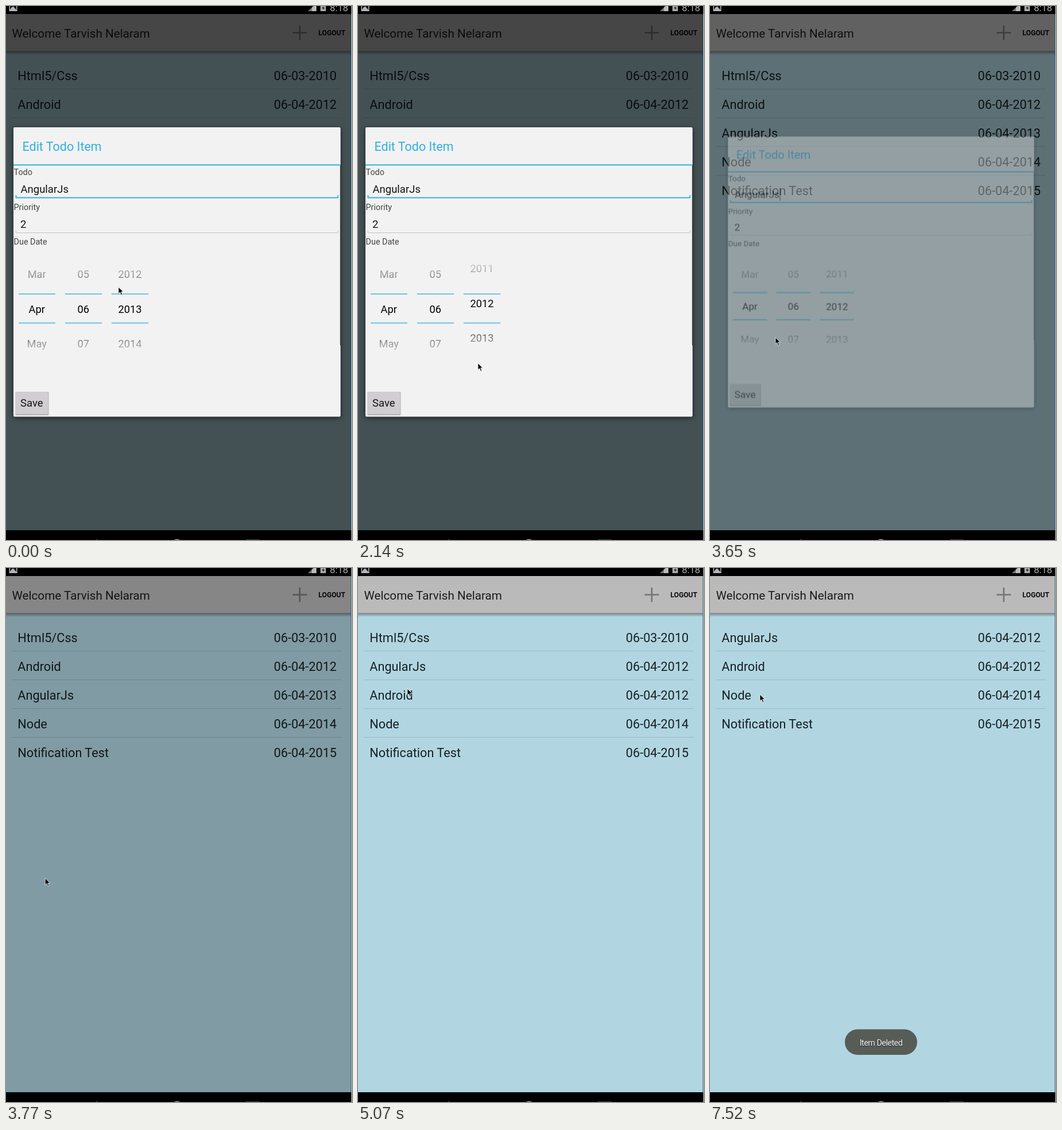
Animation, 603 px wide and 929 px high, one loop 8000 ms. Source, as an HTML page:

```html
<!DOCTYPE html>
<html lang="en">
<head>
<meta charset="utf-8">
<title>Todo list</title>
<style>
html, body { margin: 0; width: 100%; height: 100%; overflow: hidden; background: #000; }
svg { display: block; width: 603px; height: 929px; font-family: Roboto, sans-serif; }
.row { font-size: 21.7px; fill: #182023; }
.label { font-size: 14.4px; fill: #444; }
.input { font-size: 18.5px; fill: #141414; }
.wheel { font-size: 18.3px; fill: #000; text-anchor: middle; }

.list, #dialog, #dim, #press { animation: 8s step-end infinite; }
#list0 { animation-name: list0; }
#list1 { animation-name: list1; }
#list2 { animation-name: list2; }
#list3 { animation-name: list3; }
@keyframes list0 { 0% { opacity: 1 } 53.5%, 100% { opacity: 0 } }
@keyframes list1 { 0% { opacity: 0 } 53.5% { opacity: 1 } 55.375%, 100% { opacity: 0 } }
@keyframes list2 { 0% { opacity: 0 } 55.375% { opacity: 1 } 88%, 100% { opacity: 0 } }
@keyframes list3 { 0% { opacity: 0 } 88%, 100% { opacity: 1 } }

#press { animation-name: press; }
@keyframes press {
  0% { opacity: 0 } 72.5% { opacity: .35 } 76.25% { opacity: .5 }
  78.125% { opacity: .65 } 80%, 100% { opacity: 0 }
}

#dim { animation-name: dim; }
@keyframes dim {
  0% { opacity: .62 } 45.625% { opacity: .48 } 47.125% { opacity: .28 }
  48.625% { opacity: .09 } 50.125% { opacity: .03 } 52%, 100% { opacity: 0 }
}

#dialog { transform-origin: 298px 462.5px; animation-name: close; }
@keyframes close {
  0% { transform: none; opacity: 1 }
  44.125% { transform: scale(.975); opacity: .75 }
  45.625% { transform: scale(.936); opacity: .37 }
  47.125%, 100% { transform: scale(.9); opacity: 0 }
}
#panel { filter: drop-shadow(0 2px 4px rgba(0,0,0,.6)); }

#caret { animation: blink 1s step-end infinite; }
@keyframes blink { 0% { opacity: 0 } 23% { opacity: 1 } 73%, 100% { opacity: 0 } }

#years { animation: spin 8s steps(1, end) infinite; }
@keyframes spin {
  0% { transform: none }
  16.04% { transform: none; animation-timing-function: steps(6, end) }
  26.75% { transform: translateY(50.5px) }
  28.5% { transform: translateY(58px) }
  30%, 100% { transform: translateY(60.5px) }
}

#toast { animation: toast 8s steps(4, end) infinite; }
@keyframes toast { 0%, 88% { opacity: 0 } 94%, 100% { opacity: 1 } }

#cursor { animation: move 8s steps(1, end) infinite; }
@keyframes move {
  0% { transform: translate(196px, 489px); animation-timing-function: steps(4, end) }
  7% { transform: translate(79px, 535px); animation-timing-function: steps(5, end) }
  14.25% { transform: translate(212px, 567px); animation-timing-function: steps(7, end) }
  26.75% { transform: translate(209px, 621.5px) }
  28.5% { transform: translate(209px, 638px); animation-timing-function: steps(5, end) }
  36.875% { transform: translate(46px, 685px) }
  40.375% { transform: translate(46px, 685px); animation-timing-function: steps(4, end) }
  45.625% { transform: translate(114px, 576.5px); animation-timing-function: steps(2, end) }
  48.625% { transform: translate(22.5px, 503px); animation-timing-function: steps(2, end) }
  52% { transform: translate(85px, 212px) }
  58.875% { transform: translate(85px, 212px); animation-timing-function: steps(3, end) }
  63.375% { transform: translate(86px, 210px); animation-timing-function: steps(3, end) }
  68.625% { transform: translate(99px, 122.5px) }
  82% { transform: translate(99px, 122.5px); animation-timing-function: steps(7, end) }
  92.5%, 100% { transform: translate(87px, 220px) }
}
</style>
</head>
<body>
<svg viewBox="0 0 603 929">
  <defs>
    <linearGradient id="shade" x1="0" y1="0" x2="0" y2="1">
      <stop offset="0" stop-opacity=".3"/><stop offset="1" stop-opacity="0"/>
    </linearGradient>
    <linearGradient id="fade" gradientUnits="userSpaceOnUse" x1="0" y1="437" x2="0" y2="617">
      <stop offset="0" stop-color="#fff" stop-opacity="0"/>
      <stop offset=".44" stop-color="#fff"/>
      <stop offset=".56" stop-color="#fff"/>
      <stop offset="1" stop-color="#fff" stop-opacity="0"/>
    </linearGradient>
    <mask id="drum" maskUnits="userSpaceOnUse" x="13" y="437" width="250" height="180">
      <rect x="13" y="437" width="250" height="180" fill="url(#fade)"/>
    </mask>
  </defs>

  <rect width="603" height="929"/>
  <g id="app">
    <rect y="14" width="602" height="898" fill="#b1d6e1"/>
    <rect y="14" width="602" height="65" fill="#bababa"/>
    <rect y="78" width="602" height="2" fill="#8d9193"/>
    <rect y="80" width="602" height="5" fill="url(#shade)"/>
    <text x="10.5" y="55" font-size="20.7" fill="#1c1c1c">Welcome Tarvish Nelaram</text>
    <path d="M512 34v25M499.500 46.500h25" stroke="#747474" stroke-width="2.600"/>
    <text x="544.500" y="51" font-size="12.200" font-weight="700" fill="#0c0c0c">LOGOUT</text>
    <rect id="press" x="10" y="95" width="576" height="50" fill="#33b5e5"/>
    <g id="lists"></g>
  </g>
  <rect id="dim" y="14" width="602" height="898"/>

  <g id="dialog">
    <rect id="panel" x="13" y="211" width="570" height="503.500" rx="2" fill="#f2f2f2"/>
    <rect x="582" y="277" width="1" height="313" fill="#666"/>
    <text x="28.500" y="252" font-size="21.500" fill="#33b0de">Edit Todo Item</text>
    <rect x="13" y="275.500" width="569.500" height="2" fill="#33b0de"/>
    <text class="label" x="13.500" y="294">Todo</text>
    <text class="input" x="25.500" y="325">AngularJs</text>
    <rect id="caret" x="109.500" y="307" width="1.500" height="23.500" fill="#444"/>
    <path d="M17.500 329v4.500h561V329" fill="none" stroke="#3db0d3" stroke-width="1.800"/>
    <text class="label" x="13.500" y="354.500">Priority</text>
    <text class="input" x="25" y="385.500">2</text>
    <path d="M17.500 390.500v4h561v-4" fill="none" stroke="#c3c3c3"/>
    <text class="label" x="13.500" y="415">Due Date</text>
    <g id="picker" mask="url(#drum)"></g>
    <path d="M22 501h64M103 501h64M184 501h64M22 551.500h64M103 551.500h64M184 551.500h64" stroke="#6cc4e6" stroke-width="2"/>
    <rect x="16.500" y="671" width="58" height="41" rx="1.500" fill="#b4b2b5"/>
    <rect x="17" y="671" width="56.500" height="39" rx="1" fill="#d0ced1"/>
    <text class="input" x="25" y="697">Save</text>
  </g>

  <g id="toast">
    <rect x="235" y="802.500" width="126" height="44.500" rx="22" fill="#575d56"/>
    <text x="298" y="831" font-size="14.400" letter-spacing="-.55" text-anchor="middle" fill="#f4f4f4"
      style="text-shadow:0 1px 2px #222">Item Deleted</text>
  </g>

  <g id="bars">
    <rect x="601" y="14" width="1" height="898" fill="#2c4a60"/>
    <rect x="602" width="1" height="929" fill="#dbe6ec"/>
    <rect x="5.500" width="14" height="9" fill="#b4b4b4"/>
    <path d="M7 6.500V0h11v6.500l-3-3-2-2.500-3 1z" fill="#111"/>
    <path d="M526 9L541 -4V9z" fill="#777"/>
    <path d="M533 9V2.500L541 -4V9z" fill="#bbb"/>
    <rect x="548" width="9.500" height="9" fill="#aaa"/>
    <path d="M554 0l-3.500 4h2.500l-1 3 3.500-4h-2.500z"/>
    <text x="564.500" y="8.500" font-size="16.500" fill="#b0b0b0">8:18</text>
    <path d="M290 930q8-5 16 0z" fill="#aaa"/>
    <path d="M418 928.500h24M157 928.500h3" stroke="#444"/>
  </g>
  <path id="cursor" d="M0 0V11.500L2.700 9L4.800 13.700L6.800 12.800L4.700 8.300H8.400Z" stroke="#fff" stroke-width=".8"/>
</svg>
<script>
const html5 = ["Html5/Css", "06-03-2010"];
const android = ["Android", "06-04-2012"];
const angular = year => ["AngularJs", "06-04-" + year];
const rest = [["Node", "06-04-2014"], ["Notification Test", "06-04-2015"]];
const states = [
  [html5, android, angular(2013), ...rest],
  [html5, android, angular(2012), ...rest],
  [html5, angular(2012), android, ...rest],
  [angular(2012), android, ...rest]
];

const row = ([name, date], i) => {
  const y = 128.5 + 50 * i;
  const rule = i ? `<rect x="10" y="${94 + 50 * i}" width="575" height="1" fill="#000" opacity=".13"/>` : "";
  return `${rule}<text x="20.3" y="${y}">${name}</text><text x="576.3" y="${y}" text-anchor="end">${date}</text>`;
};
document.getElementById("lists").innerHTML = states.map((rows, i) =>
  `<g class="list row" id="list${i}">${rows.map(row).join("")}</g>`).join("");

const wheel = (id, x, first, items) => `<g class="wheel" id="${id}">` + items.map((s, i) =>
  `<text x="${x}" y="${533.5 + 60.5 * (first + i)}">${s}</text>`).join("") + "</g>";
document.getElementById("picker").innerHTML =
  wheel("months", 53.7, -1, ["Mar", "Apr", "May"]) +
  wheel("days", 134.8, -1, ["05", "06", "07"]) +
  wheel("years", 216, -2, [2011, 2012, 2013, 2014]);
</script>
</body>
</html>
```
